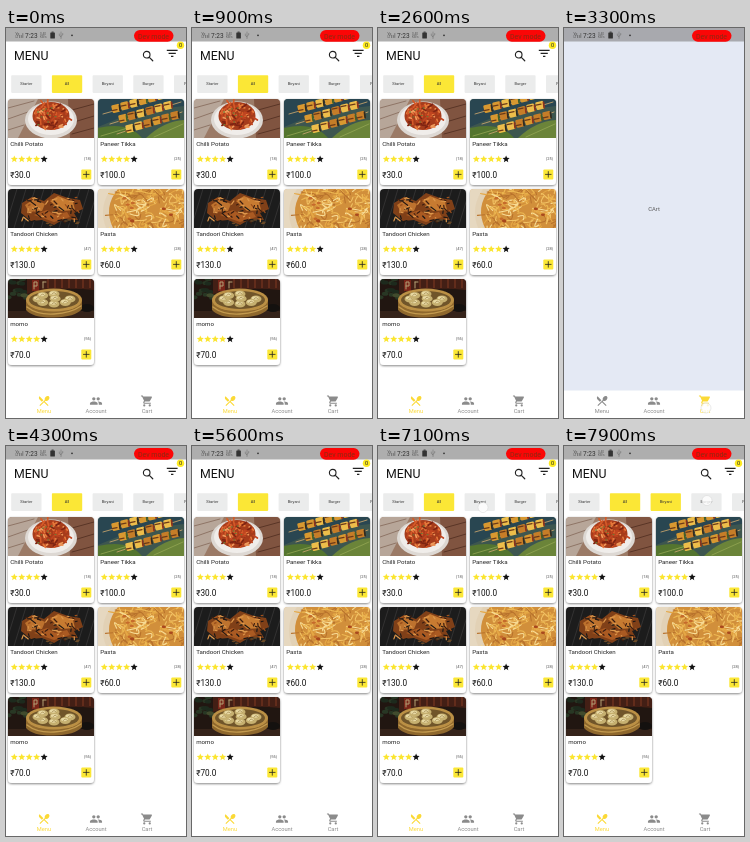
Write an HTML page that moves like this. It is 180 by 390 pixels and loops after 8000 ms.

```html
<!DOCTYPE html>
<html lang="en">
<head>
<meta charset="utf-8">
<title>Food menu</title>
<style>
html, body { margin: 0; width: 100%; height: 100%; overflow: hidden; background: #fff; }
svg { display: block; width: 100vw; height: 100vh; }
text { font-family: Roboto, "Noto Sans", sans-serif; }
</style>
</head>
<body>
<svg id="stage" viewBox="0 0 180 390" preserveAspectRatio="none"></svg>
<script>
const LOOP = 8000;
const YELLOW = '#fbe736', TAB_ON = '#fbd936', TAB_OFF = '#8b8b8b', CHIP = '#ebecec';
const stage = document.getElementById('stage');

const rect = (x, y, w, h, fill, more = '') =>
  `<rect x="${x}" y="${y}" width="${w}" height="${h}" fill="${fill}" ${more}/>`;
const oval = (x, y, rx, ry, fill, more = '') =>
  `<ellipse cx="${x}" cy="${y}" rx="${rx}" ry="${ry}" fill="${fill}" ${more}/>`;
const path = (d, fill, more = '') => `<path d="${d}" fill="${fill}" ${more}/>`;
const line = (d, color, width, more = '') =>
  path(d, 'none', `stroke="${color}" stroke-width="${width}" stroke-linecap="round" ${more}`);
const text = (x, y, size, str, fill = '#222', more = '') =>
  `<text x="${x}" y="${y}" font-size="${size}" fill="${fill}" ${more}>${str}</text>`;
const MID = 'text-anchor="middle"';
const icon = (name, x, y, scale, more = '') =>
  `<g transform="translate(${x} ${y}) scale(${scale}) translate(-12 -12)" ${more}>${ICONS[name]}</g>`;

const ICONS = {
  menu: '<path d="M8.1 13.3l2.8-2.8L3.9 3.5c-1.6 1.6-1.6 4.1 0 5.7zM14.9 11.5c1.5.7 3.7.2 5.3-1.4 1.9-1.9 2.3-4.6.8-6.1-1.5-1.5-4.2-1.1-6.1.8-1.6 1.6-2.1 3.7-1.4 5.3L3.7 19.9l1.4 1.4L12 14.4l6.9 6.9 1.4-1.4L13.4 13z"/>',
  people: '<circle cx="8" cy="8" r="3"/><circle cx="16" cy="8" r="3"/>' +
    '<path d="M1 19v-2.5C1 14.2 5.7 13 8 13s7 1.2 7 3.5V19zM17 19v-2.5c0-1.5-.8-2.6-2-3.450 3-.3 8 1 8 3.450V19z"/>',
  cart: '<circle cx="7" cy="20" r="2"/><circle cx="17" cy="20" r="2"/>' +
    '<path d="M1 2h3.3l.9 2H20q1.4.2.9 1.5l-3.6 6.5q-.6 1-1.750 1H8.1L7.2 15H19v2H7q-2.8-.4-1.750-3L6.6 11.6 3 4H1z"/>',
  star: '<path d="M12 17.3 18.2 21l-1.650-7L22 9.2l-7.2-.6L12 2 9.2 8.6 2 9.2 7.460 14 5.8 21z"/>',
  search: '<circle cx="9.5" cy="9.5" r="5.5" fill="none" stroke="#222" stroke-width="1.9"/>' +
    line('M14.3 14.3 19.6 19.6', '#222', 2),
  filter: '<path d="M3 6h18v2H3zM6 11h12v2H6zM10 16h4v2h-4z"/>'
};

function random(seed) {
  return (a = 0, b = 1) => {
    seed = (seed * 16807) % 2147483647;
    return a + (b - a) * seed / 2147483647;
  };
}
const repeat = (n, fn) => Array.from({ length: n }, (_, i) => fn(i)).join('');
const pick = (r, list) => list[Math.floor(r() * list.length)];

// Flat food pictures, each 86 by 39
const food = {
  potato() {
    const r = random(71);
    return rect(0, 0, 86, 39, '#9b7a66') +
      path('M0 0H30L10 39H0z', '#b7a699') +
      line('M0 9 26 2M0 20 20 13M0 31 16 26', '#84695a', .8) +
      path('M60 0H86V39H62z', '#805440') + line('M64 11 86 5M66 23 86 17M64 35 86 29', '#593526', 1) +
      oval(43, 21, 26, 18.5, '#ddd8d3') + oval(43, 20, 23, 16, '#f0edea') +
      oval(43, 17, 18.5, 14, '#a63c1b') +
      repeat(75, () => {
        const a = r(0, 6.28), d = Math.sqrt(r()), x = 43 + 17 * d * Math.cos(a), y = 17 + 13 * d * Math.sin(a);
        return line(`M${x} ${y}l${r(-5, 5)} ${r(-5, 5)}`, pick(r, ['#d55a28', '#e5793b', '#7f2412', '#c04520', '#f09a5c']), 1.7);
      }) +
      repeat(10, () => oval(r(30, 56), r(6, 26), 1.1, .7, '#6a7c35'));
  },
  paneer() {
    const r = random(29);
    return rect(0, 0, 86, 39, '#3d564f') + path('M0 0H86V7L36 13 0 28z', '#294651') +
      path('M0 29Q30 22 44 39H0z', '#54752f') + path('M48 39Q66 22 86 21V39z', '#6b8439') +
      line('M3 37 30 29M56 38 85 25', '#93a653', .8) +
      repeat(3, k => {
        const dx = k * 7, dy = k * 10;
        return line(`M${5 + dx} ${15 + dy}L${82 + k} ${dy - 7}`, '#c1a16b', .9) +
          repeat(6, i => {
            const x = 13 + dx + i * 9, y = 6.5 + dy - i * 2.6;
            return rect(x, y, 8, 8, pick(r, ['#d89830', '#edbd4a', '#c67d28']), `rx="1.3" transform="rotate(-14 ${x} ${y})"`) +
              line(`M${x + 1} ${y + r(1, 6)}l5-1`, '#6c3a18', 1.3) +
              line(`M${x + 8.5} ${y}l.6 5`, pick(r, ['#445f26', '#8a331d', '#302b20']), 1.8);
          });
      });
  },
  tandoori() {
    const r = random(113);
    return rect(0, 0, 86, 39, '#1c1c1c') +
      repeat(12, i => line(`M${i * 9} 0l-12 39`, '#363535', .9)) +
      path('M14 14 24 8 36 12 46 4 60 9 72 11 75 20 66 24 70 31 56 30 46 36 34 31 23 32 13 24z', '#804018') +
      path('M17 16 26 10 37 15 34 22 21 23z', '#bd722e') +
      path('M42 12 50 7 65 13 67 21 53 22z', '#c77b31') +
      path('M26 26 39 21 47 26 59 23 62 28 46 33z', '#aa5a22') +
      repeat(65, () => line(`M${r(15, 72)} ${r(8, 32)}l${r(-5, 5)} ${r(-1, 4)}`,
        pick(r, ['#3b1d10', '#dc964a', '#201713', '#9d511d', '#1b1816']), 1.2)) +
      repeat(6, () => oval(r(3, 83), r(30, 38), 2, .8, '#6c4a26'));
  },
  pasta() {
    const r = random(47);
    return rect(0, 0, 86, 39, '#d18f3b') + path('M0 0H20Q5 18 15 39H0z', '#e2d1b5') +
      repeat(135, () => {
        const x = r(17, 90), y = r(-3, 42);
        return line(`M${x} ${y}q${r(-10, 10)} ${r(-12, 12)} ${r(-16, 12)} ${r(-7, 7)}`,
          pick(r, ['#f2c264', '#e5a744', '#f8dc95', '#b8722c', '#edb852']), 1.1);
      }) +
      path('M0 0H13Q0 18 8 39H0z', '#e6d8c0') +
      repeat(10, () => oval(r(26, 78), r(4, 35), 2, 1.2, pick(r, ['#a9481d', '#c66a2a'])));
  },
  momo() {
    const r = random(83);
    return rect(0, 0, 86, 39, '#211611') + path('M19 0H86V11Q52 7 19 15z', '#431f15') +
      repeat(7, i => rect(39 + i * 7, 0, 2, 9, '#622c1b')) +
      repeat(14, () => oval(r(0, 22), r(0, 20), r(2, 4), 2, pick(r, ['#283724', '#1d2a1d', '#414b2d']))) +
      rect(24, 1, 7, 11, '#792519') + line('M26 10V3h3v4h-3M35 3v6M35 3h3', '#b3a075', 1) +
      path('M0 32H86V39H0z', '#35231a') + oval(79, 29, 7, 4, '#14110f') +
      path('M18 21V31Q25 39 46 38.500T74 30V21z', '#8f682d') +
      line('M19 28Q29 36 46 35T73 27', '#c39a4e', 1.4) +
      oval(46, 21, 28, 11.5, '#bb9045') + oval(46, 21, 25, 9, '#70552a') +
      repeat(8, i => {
        const a = i * Math.PI / 4, n = i < 7 ? 1 : .1, x = 46 + 16 * n * Math.cos(a), y = 20 + 5 * n * Math.sin(a);
        return oval(x, y, 5.5, 3.5, '#c6b070') + oval(x - .8, y - 1, 3.4, 1.7, '#e8d9a4') +
          line(`M${x - 2} ${y}q2-3 4 0`, '#927940', .6);
      });
  }
};

const dishes = [
  ['potato', 'Chilli Potato', '30.0', 18],
  ['paneer', 'Paneer Tikka', '100.0', 25],
  ['tandoori', 'Tandoori Chicken', '130.0', 47],
  ['pasta', 'Pasta', '60.0', 28],
  ['momo', 'momo', '70.0', 56]
];

function card([pic, name, price, votes], i) {
  const x = 2 + (i % 2) * 90, y = 71 + Math.floor(i / 2) * 90;
  return `<g transform="translate(${x} ${y})">` +
    rect(0, 0, 86, 86, '#fff', 'rx="4" filter="url(#shadow)"') +
    `<g clip-path="url(#photo)">${food[pic]()}</g>` +
    text(2.2, 47, 6.15, name) +
    repeat(5, k => icon('star', 6.3 + k * 7.450, 60, .35, `fill="${k < 4 ? '#fbe52f' : '#111'}"`)) +
    text(83.3, 61.4, 4.1, `(${votes})`, '#555', 'text-anchor="end"') +
    text(2.2, 78.6, 8.2, '₹' + price, '#111') +
    rect(73.3, 70.4, 10, 10, YELLOW, 'rx="1"') +
    line('M75.5 75.4h5.6M78.3 72.6v5.6', '#222', .8) + '</g>';
}

const chips = ['Starter', 'All', 'Biryani', 'Burger', 'Pizza'];
const chip = (label, i) => {
  const x = 5.2 + i * 40.7;
  return rect(x, 47.2, 30.3, 17.7, i === 1 ? YELLOW : CHIP, `id="chip${i}" rx=".8"`) +
    text(x + 15.150, 57.4, 4, label, '#333', MID);
};

const tabs = [['Menu', 'menu', 38], ['Account', 'people', 90], ['Cart', 'cart', 141]];
const tab = ([label, name, x], i) => `<g id="tab${i}">` +
  icon(name, x, 373, .55) + text(x, 384.5, 5.7, label, 'inherit', MID) + '</g>';

const statusBar = rect(0, 0, 180, 13.5, '#aeaeae', 'id="bar"') +
  text(9.5, 6.6, 3.2, 'Vo', '#444') + text(9.5, 10, 3.2, 'LTE', '#444') +
  line('M15.6 9.5v-2M16.8 9.5v-4', '#555', .6) +
  text(19, 9.9, 6.5, '7:23', '#333') +
  text(34, 6.6, 3, '0.40', '#555') + text(34, 10, 3, 'KB/s', '#555') +
  rect(44.3, 4.5, 4.6, 6, '#333', 'rx=".6"') + rect(45.6, 3.6, 2, 1, '#333') +
  line('M55 4v6.5M53.3 6v1.5l1.7 1.3M56.7 5.5v1.5l-1.7 1.3', '#666', .5) +
  oval(66, 7.3, .9, .9, '#333') +
  rect(128, 2, 39.5, 11.7, '#fb0606', 'rx="5.850"') +
  text(147.5, 10.5, 7, 'Dev mode', '#8a2a12', MID);

stage.innerHTML = `<defs>
  <clipPath id="photo"><path d="M0 39V4Q0 0 4 0H82Q86 0 86 4V39z"/></clipPath>
  <filter id="shadow" x="-10%" y="-10%" width="120%" height="120%">
    <feDropShadow dx="0" dy=".9" stdDeviation=".8" flood-color="#000" flood-opacity=".5"/>
  </filter></defs>` +
  rect(0, 0, 180, 390, '#fff') +
  '<g id="menuPage">' +
  text(8, 32.3, 12.3, 'MENU', '#111') +
  icon('search', 142.2, 28.2, .6) + icon('filter', 166.2, 25.4, .6, 'fill="#222"') +
  chips.map(chip).join('') + dishes.map(card).join('') + '</g>' +
  '<g id="plainPage">' + rect(0, 13, 180, 349.5, '#e4e9f4') +
  text(90, 183, 5.8, '', '#555', MID + ' id="pageName"') + '</g>' +
  statusBar +
  '<g id="badge">' + oval(174.5, 17.3, 3.7, 3.8, '#fdea22') + text(174.5, 19.3, 5.6, '0', '#222', MID) + '</g>' +
  tabs.map(tab).join('') +
  '<circle id="touch" r="5" fill="#fff" fill-opacity=".78" stroke="#d5d5d5" stroke-width=".5"/>';

const $ = id => document.getElementById(id);
const show = (id, on) => $(id).setAttribute('display', on ? 'inline' : 'none');

// start, end, x, y of each finger press
const touches = [
  [2800, 3000, 90, 380],
  [3300, 3500, 142, 380],
  [3900, 4100, 32, 384],
  [7000, 7300, 105, 61.5],
  [7900, 8000, 143, 54.5]
];

function draw(t) {
  const page = t < 2800 || t >= 4300 ? 0 : t < 3300 ? 1 : 2;
  const active = t >= 4100 ? 0 : page;
  show('menuPage', page === 0);
  show('badge', page === 0);
  show('plainPage', page > 0);
  $('pageName').textContent = ['', 'Account', 'CArt'][page];
  $('bar').setAttribute('fill', page ? '#a8a9ae' : '#aeaeae');
  tabs.forEach((_, i) => $('tab' + i).setAttribute('fill', i === active ? TAB_ON : TAB_OFF));
  $('chip2').setAttribute('fill', t >= 7200 ? YELLOW : CHIP);
  const press = touches.find(([from, to]) => t >= from && t < to);
  show('touch', press);
  if (press) {
    $('touch').setAttribute('cx', press[2]);
    $('touch').setAttribute('cy', press[3]);
  }
}

const start = performance.now();
function tick() {
  draw((performance.now() - start) % LOOP);
  requestAnimationFrame(tick);
}
tick();
</script>
</body>
</html>
```
